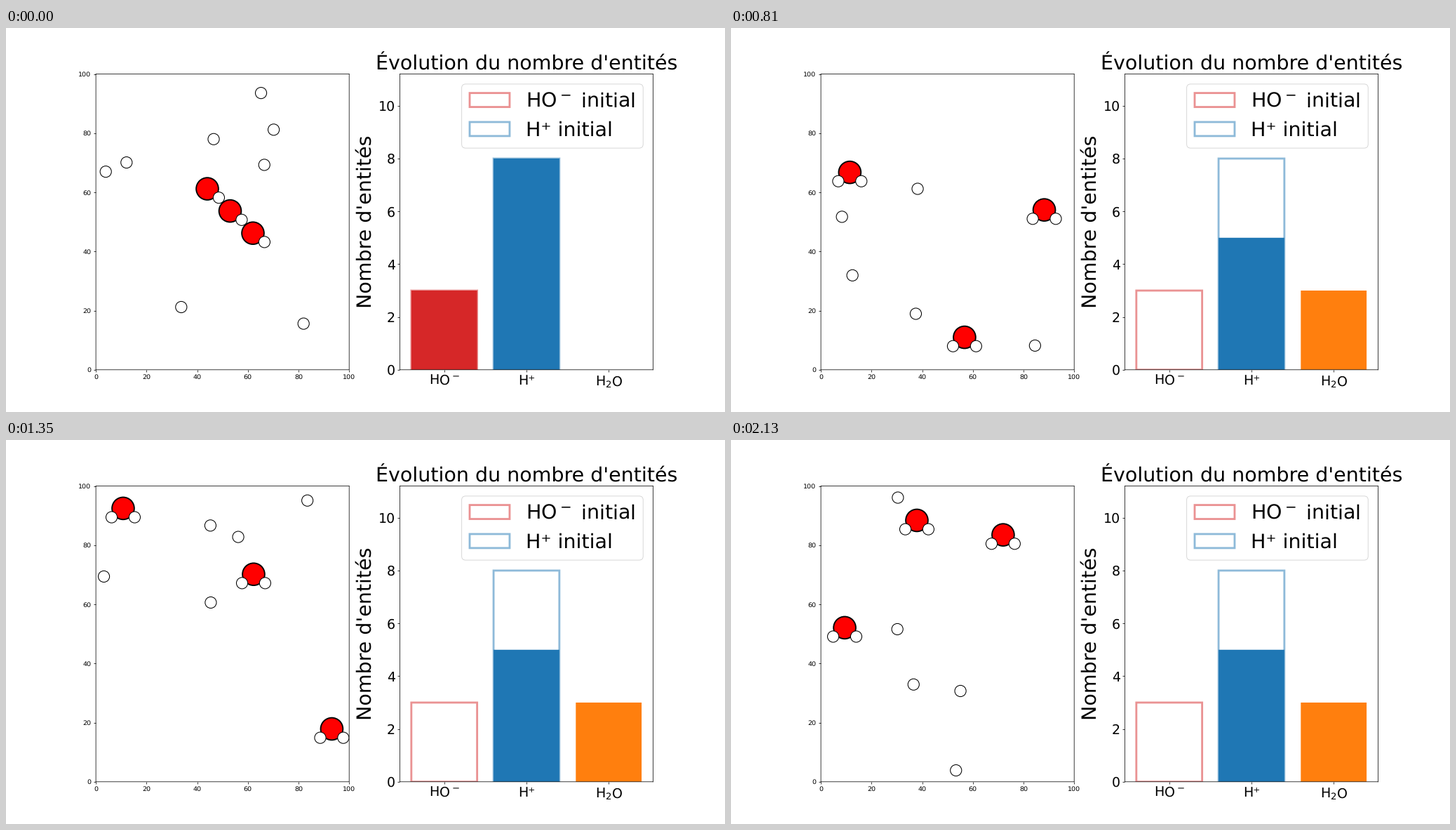
Recreate the animation shown at these times as a matplotlib script. Size 1025 px wide and 547 px high, loop 2.16 s.

```python
import matplotlib.pyplot as plt
import numpy as np
from matplotlib.animation import FuncAnimation

W, H = 1025, 547
DPI = W / 15
CYCLE, LOOPS, STEP_MS = 36, 2, 30
RED, BLUE, ORANGE = "tab:red", "tab:blue", "tab:orange"
plt.rcParams.update({"text.hinting": "none", "path.snap": False})

# Hydroxides start on a diagonal; each one binds an ion some frames later.
row = np.arange(3)
HO_START = np.column_stack([44 + 9 * row, 61.2 - 7.5 * row])
HO_SPEED = np.array([(2.03, 6.18), (4.54, -3.98), (-6.64, 5.14)])
MEET = 2 + 2 * row
BOUND_START = np.array([(46.5, 78), (33.7, 21.2), (3.9, 67)])

FREE_START = np.array([(65.2, 93.6), (70.2, 81.2), (66.5, 69.3), (12.1, 70.1), (82, 15.6)])
FREE_SPEED = np.array([(-1, -1.2), (-2.76, 6.02), (5.11, 3.51), (3.68, 4.36), (-8.76, 5.98)])

HO_WALL, ION_WALL = 6.5, 2
RIGHT_BOND = np.array([4.55, -3.0])
LEFT_BOND = RIGHT_BOND * (-1, 1)


def travel(start, speed, t, wall):
    """Straight motion with elastic bounces, staying `wall` inside the box."""
    span = 100 - 2 * wall
    u = start + speed * t - wall
    return wall + span - np.abs(u % (2 * span) - span)


def bound_ions(t):
    """Ions glide to their hydroxide, then stay on its left side."""
    when = np.maximum(t, MEET)[:, None]
    goal = travel(HO_START, HO_SPEED, when, HO_WALL) + LEFT_BOND
    done = np.minimum(t / MEET, 1)[:, None]
    return BOUND_START + (goal - BOUND_START) * done


def positions(t):
    oxygens = travel(HO_START, HO_SPEED, t, HO_WALL)
    ions = travel(FREE_START, FREE_SPEED, t, ION_WALL)
    return np.vstack([oxygens, oxygens + RIGHT_BOND, ions, bound_ions(t)])


def counts(t):
    water = np.sum(t >= MEET)
    return 3 - water, 8 - water, water


fig, (box, chart) = plt.subplots(
    1, 2, figsize=((W + 0.01) / DPI, (H + 0.01) / DPI), dpi=DPI
)

start = positions(0)
big = np.arange(len(start)) < len(HO_START)
atoms = box.scatter(
    *start.T,
    s=np.where(big, 33.4, 17) ** 2,
    c=np.where(big, "red", "white"),
    linewidths=np.where(big, 2, 1.1),
    edgecolors="black",
)
box.set(xlim=(0, 100), ylim=(0, 100))

outlines = zip(counts(0), (RED, BLUE), ("HO$^-$ initial", "H⁺ initial"))
for x, (count, color, label) in enumerate(outlines):
    chart.bar(x, count, fill=False, edgecolor=color, lw=3, alpha=0.5, label=label)
bars = chart.bar(range(3), counts(0), color=[RED, BLUE, ORANGE])
chart.set(xlim=(-0.54, 2.54), ylim=(0, 11.2))
chart.set_xticks(range(3), ["HO$^-$", "H⁺", "H$_2$O"])
chart.set_yticks(range(0, 11, 2))
chart.tick_params(labelsize=20)
chart.set_title("Évolution du nombre d'entités", fontsize=30)
chart.set_ylabel("Nombre d'entités", fontsize=30)
chart.legend(fontsize=30, loc="upper right")


def draw(frame):
    t = frame % CYCLE
    atoms.set_offsets(positions(t))
    for bar, height in zip(bars, counts(t)):
        bar.set_height(height)
    return atoms, *bars


anim = FuncAnimation(
    fig, draw, frames=CYCLE * LOOPS, interval=STEP_MS, repeat=True, repeat_delay=0
)
plt.show()
```
